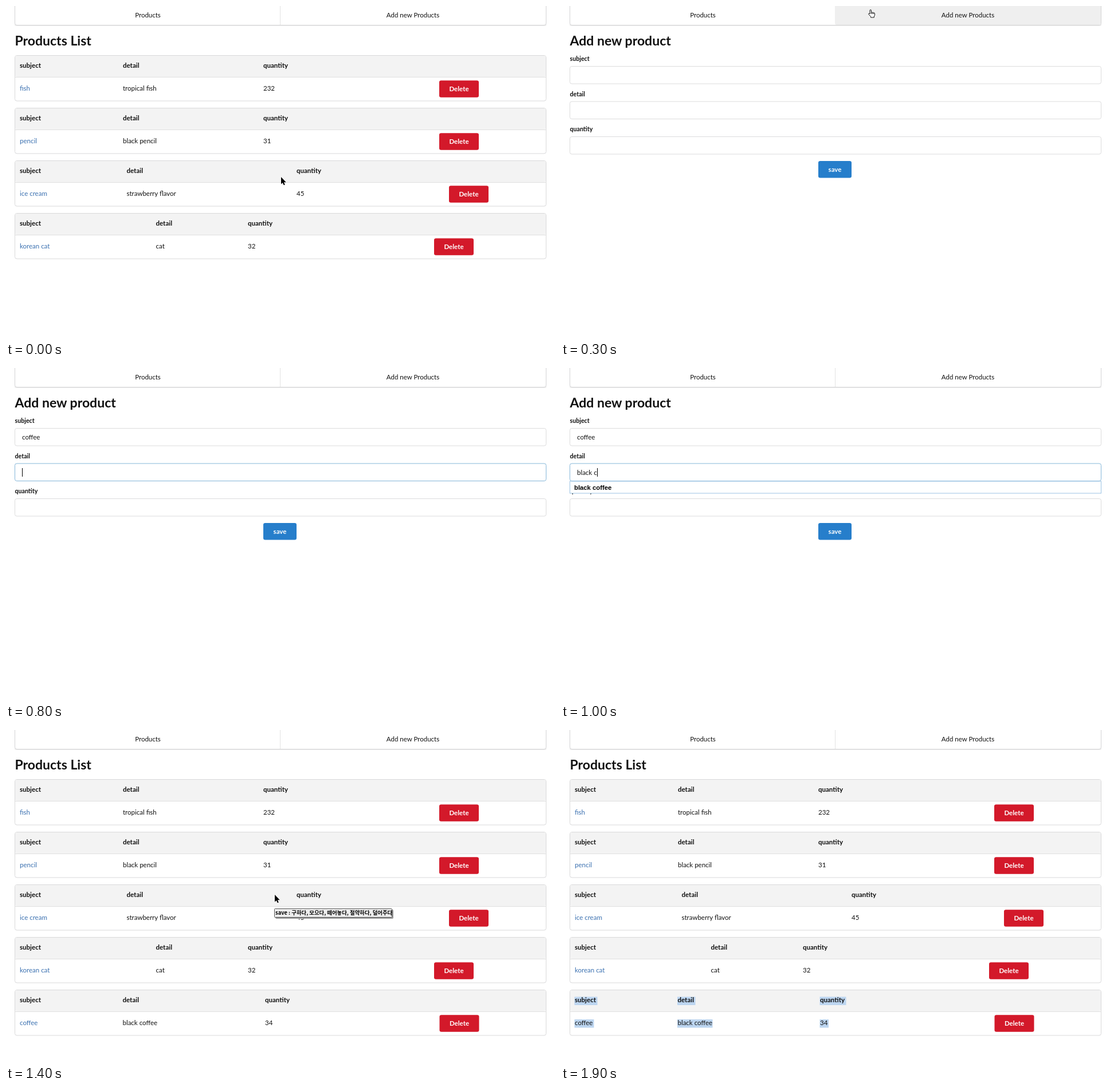
Recreate the animation shown at these times as an HTML page. Size 958 by 584 pixels, loop 2 s.

```html
<!DOCTYPE html>
<html lang="en">
<head>
<meta charset="utf-8">
<title>Products</title>
<style>
  html, body { margin: 0; width: 100%; height: 100%; overflow: hidden; background: #fff; }
  svg { display: block; }
  text { font: 11.5px Lato, sans-serif; fill: #111; white-space: pre; }
  .bold { font-weight: 700; }
  .title { font-size: 23px; font-weight: 700; }
  .label { font-size: 10.65px; font-weight: 700; }
  .link { fill: #3a70b0; }
  .button { fill: #fff; font-weight: 700; text-anchor: middle; }
  .tab { text-anchor: middle; }
  .suggestion { font: 700 11.3px "Liberation Sans", Arial, sans-serif; fill: #000; }
  .hint { font: 700 9.4px "Noto Sans CJK KR", "Noto Sans CJK", sans-serif; fill: #000; }
</style>
</head>
<body>
<svg id="stage" width="958" height="584" viewBox="0 0 958 584"></svg>
<script>
const stage = document.getElementById('stage');
const STEP = 100, STEPS = 20;

const products = [
  { cells: ['fish', 'tropical fish', '232'], columns: [24, 204, 449], button: 756 },
  { cells: ['pencil', 'black pencil', '31'], columns: [24, 204, 449], button: 756 },
  { cells: ['ice cream', 'strawberry flavor', '45'], columns: [24, 210.5, 507], button: 773 },
  { cells: ['korean cat', 'cat', '32'], columns: [24, 261.5, 422], button: 747 },
  { cells: ['coffee', 'black coffee', '34'], columns: [24, 203.5, 452], button: 756.5 }
];
const fields = ['subject', 'detail', 'quantity'];
const suggestions = ['coffee', 'black coffee'];

// Each state holds from its step until the next one.
const states = [
  { cursor: ['arrow', 480, 299] },
  { cursor: ['arrow', 517, 130] },
  { cursor: ['hand', 536, 6], hover: true },
  { form: ['', '', ''], cursor: ['hand', 536, 6], hover: true },
  { form: ['', '', ''], focus: 0, caret: true },
  { form: ['co', '', ''], focus: 0, caret: true, suggest: true },
  { form: ['coffe', '', ''], focus: 0, caret: true, suggest: true },
  { form: ['coffee', '', ''], focus: 0, caret: true },
  { form: ['coffee', '', ''], focus: 1, caret: true },
  { form: ['coffee', 'bla', ''], focus: 1, caret: true, suggest: true },
  { form: ['coffee', 'black c', ''], focus: 1, caret: true, suggest: true },
  { form: ['coffee', 'black coffee', ''], focus: 1, caret: true },
  { form: ['coffee', 'black coffee', '3'], focus: 2, caret: true },
  { form: ['coffee', 'black coffee', '34'], focus: 2 },
  { saved: true, cursor: ['arrow', 469, 288], hint: true },
  { saved: true, cursor: ['arrow', 300, 430] },
  { saved: true, cursor: ['arrow', 19, 456] },
  { saved: true, cursor: ['arrow', 520, 476], selectedRows: 1 },
  { saved: true, cursor: ['arrow', 904, 494], selectedRows: 2 },
  { saved: true, selectedRows: 2 }
];

const text = (x, y, value, style = '') => `<text x="${x}" y="${y}" class="${style}">${value}</text>`;
const rect = (x, y, w, h, fill, stroke = 'none', r = 0) =>
  `<rect x="${x}" y="${y}" width="${w}" height="${h}" rx="${r}" fill="${fill}" stroke="${stroke}"/>`;
const line = (x1, y1, x2, y2, color) => `<path d="M${x1} ${y1}L${x2} ${y2}" stroke="${color}"/>`;
const button = (x, y, w, label, color) =>
  rect(x, y, w, 29.5, color, 'none', 3.3) + text(x + w / 2, y + 19, label, 'button');

function menu(hover) {
  return rect(15, 30, 928, 5, '#ececec', 'none', 3)
    + rect(15.5, -6.5, 927, 40, '#fff', '#d4d4d5', 3.5)
    + (hover ? rect(478, -6, 464, 39, '#efefef', 'none', 3) : line(478.5, 0, 478.5, 33, '#e2e2e2'))
    + text(247.5, 20, 'Products', 'tab') + text(710, 20, 'Add new Products', 'tab');
}

function productTable({ cells, columns, button: buttonX }, index, selectedRows) {
  const top = 86.5 + index * 92;
  const widths = [[40, 31.5, 46], [34, 61.5, 15.5]];
  let out = rect(15.5, top, 927, 79.5, '#fff', '#d9d9da', 3.5)
    + rect(16, top + 0.5, 926, 37, '#f3f3f3', 'none', 3)
    + line(16, top + 38, 942, top + 38, '#e0e0e0');
  for (let row = 0; row < selectedRows; row++)
    columns.forEach((x, i) => out += rect(x - 0.5, top + 12 + row * 39.5, widths[row][i], 14.5, '#bcd5f0'));
  columns.forEach((x, i) => {
    const linked = i === 0 && selectedRows < 2;
    out += text(x, top + 21.8, fields[i], 'bold') + text(x, top + 61.5, cells[i], linked ? 'link' : '');
  });
  return out + button(buttonX, top + 43.8, 69, 'Delete', '#d3192a');
}

function listPage({ saved, selectedRows = 0 }) {
  const shown = saved ? products : products.slice(0, 4);
  return text(15.5, 69, 'Products List', 'title')
    + shown.map((product, i) => productTable(product, i, i === 4 ? selectedRows : 0)).join('');
}

function formPage({ form, focus, suggest }) {
  let out = text(15.5, 69, 'Add new product', 'title');
  fields.forEach((name, i) => {
    const top = 105.5 + i * 61.5;
    out += text(15.5, top - 9.2, name, 'label')
      + rect(15.5, top, 927, 30.5, '#fff', i === focus ? '#85b7d9' : '#dcdcdd', 3.3)
      + text(28, top + 19.7, form[i], i === focus ? 'typed' : '');
  });
  out += button(449, 271, 58, 'save', '#267ecb');
  if (suggest) {
    const top = 136.5 + focus * 61.5;
    out += rect(15.5, top, 927, 21, '#fff', '#9cc3e4') + text(23, top + 15, suggestions[focus], 'suggestion');
  }
  return out;
}

function hint() {
  return rect(470, 314, 206, 16, '#999', 'none', 2)
    + rect(468.5, 312.5, 205, 15, '#eee', '#555', 1)
    + text(470, 322.8, 'save : 구하다, 모으다, 떼어놓다, 절약하다, 덜어주다', 'hint');
}

function cursor([kind, x, y]) {
  const hand = 'M3 8V2Q3 .5 4.2 .5T5.4 2V5.5Q6 4.5 7.5 5.4Q8.6 4.8 9.6 5.9Q11.5 5.7 11.5 7.5V9Q11.5 11 10.3 12V14H4.5V12.5L.8 8.5Q.5 6.6 2 7Z';
  const arrow = 'M0 0V12.5L2.8 9.9 4.8 14.3 6.8 13.4 4.9 9.2H8.8Z';
  return kind === 'hand'
    ? `<path transform="translate(${x} ${y})" d="${hand}M5.4 5.5V8M7.5 5.5V8M9.6 6V8" fill="#fff" stroke="#111"/>`
    : `<path transform="translate(${x} ${y})" d="${arrow}" fill="#000" stroke="#fff" paint-order="stroke"/>`;
}

function render(state) {
  stage.innerHTML = menu(state.hover)
    + (state.form ? formPage(state) : listPage(state))
    + (state.hint ? hint() : '')
    + (state.cursor ? cursor(state.cursor) : '');
  if (state.caret) {
    const x = Math.round(28 + stage.querySelector('.typed').getComputedTextLength()) + 0.5;
    const y = 113.5 + state.focus * 61.5;
    stage.insertAdjacentHTML('beforeend', line(x, y, x, y + 15, '#000'));
  }
}

let current = -1;
function tick() {
  const step = Math.floor(performance.now() / STEP) % STEPS;
  if (step !== current) render(states[current = step]);
  requestAnimationFrame(tick);
}
tick();
</script>
</body>
</html>
```
